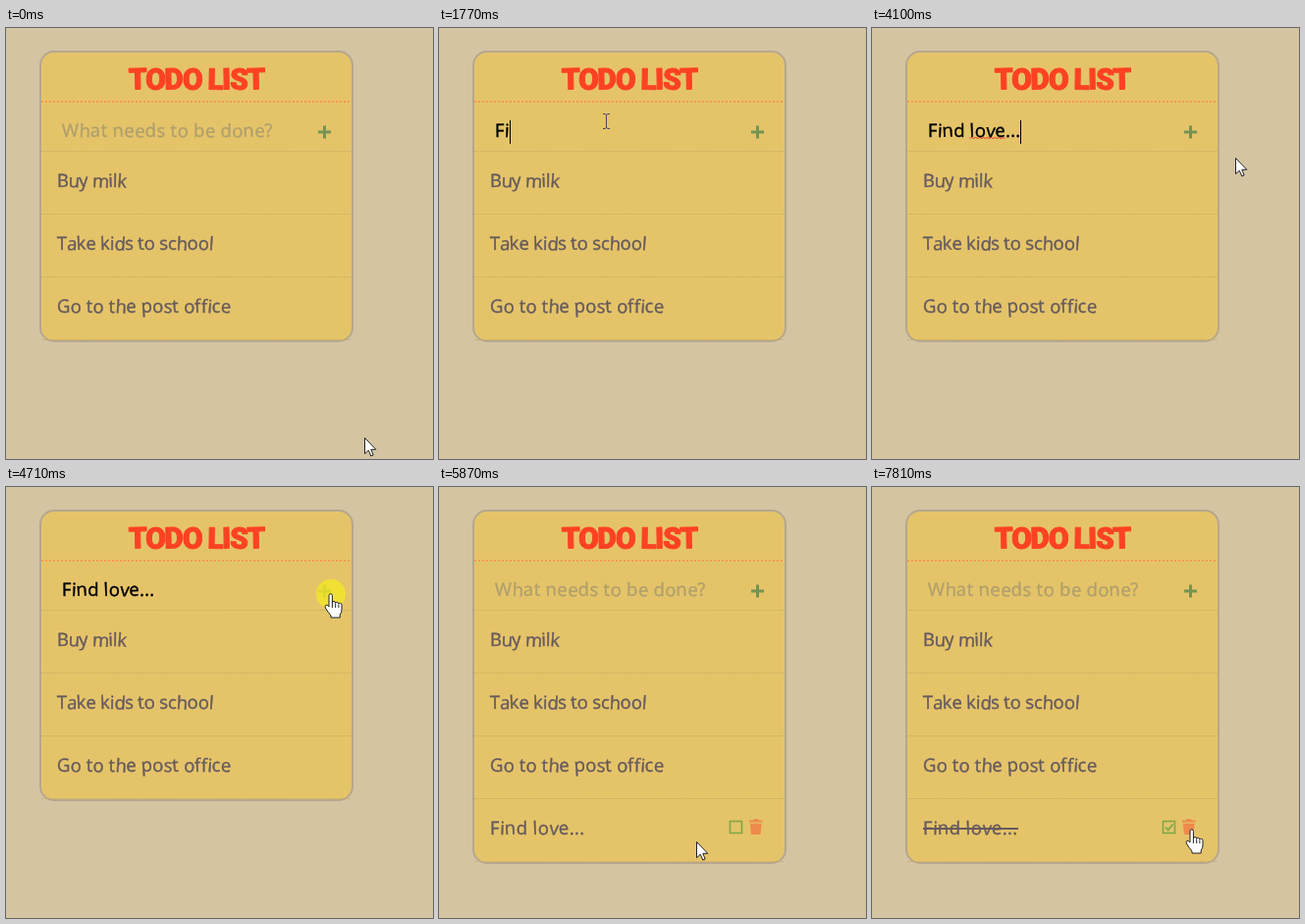
An HTML page for the animation above (8000 ms loop, 435 by 439 pixels).

```html
<!DOCTYPE html>
<html lang="en">
<head>
<meta charset="utf-8">
<title>Todo list</title>
<style>
  html, body { margin: 0; width: 100%; height: 100%; overflow: hidden; background: #d4c4a2; }
  svg { display: block; }
  text { font: 18.5px "Open Sans", sans-serif; font-kerning: none; font-variant-ligatures: none; white-space: pre; stroke-width: .4; }
  .title { font: 900 30px Roboto, sans-serif; letter-spacing: -1.3px; fill: #fd4223; stroke: #fd4223; stroke-width: 1; stroke-linejoin: round; }
  .item { fill: #675b5d; stroke: #675b5d; }
  .hint { fill: #b1a06c; stroke: #b1a06c; }
  .typed { fill: #000; stroke: #000; letter-spacing: .2px; }
  .rule { stroke: #c4a95f; stroke-dasharray: 1 1; }
</style>
</head>
<body>
<svg id="stage" width="435" height="439" viewBox="0 0 435 439">
  <rect id="card" x="35" y="24" width="318" height="295" rx="14" fill="#e5c469" stroke="#b6a78e" stroke-width="2"/>
  <text class="title" x="194" y="62.5" text-anchor="middle" rotate="-1 1 -1 1 0 1 -1 1 -1">TODO LIST</text>
  <path d="M36 75H352" stroke="#f39a50" stroke-width="2" stroke-dasharray="2 2"/>
  <path class="rule" d="M36 125.5H352"/>
  <path d="M324.5 99.5V112.5M318 106H331" stroke="#769350" stroke-width="3"/>
  <g id="rows"></g>
  <text id="hint" class="hint" x="57" y="111" letter-spacing=".3">What needs to be done?</text>
  <text id="typed" class="typed" x="57" y="111"></text>
  <path id="squiggle" fill="none" stroke="#e8301c"/>
  <path id="caret" stroke="#000"/>
  <g id="icons">
    <rect x="296.5" y="24" width="12" height="12" fill="none" stroke="#7fa746" stroke-width="1.6"/>
    <path id="tick" d="M299 30L301.7 32.8L306.5 27" fill="none" stroke="#7fa746" stroke-width="1.8"/>
    <path d="M316 23H320L321 21.5H324.5L325.5 23H329.5V25H316ZM317 26.2H328.5L327.8 36Q327.7 37.5 326.2 37.5H319.3Q317.8 37.5 317.7 36Z" fill="#ee8a4b"/>
  </g>
  <circle id="click" r="15" fill="#f3e628" opacity=".82"/>
  <g id="pointer" stroke-linejoin="round">
    <path id="arrow" d="M.5 .5V16.7L4.3 13.2L6.8 19L9.2 18L6.8 12.3H11.8Z" fill="#fff" stroke="#222"/>
    <path id="beam" d="M-3 -7.5H-1L.5 -6.5L2 -7.5H4M.5 -6.5V6.5M-3 7.5H-1L.5 6.5L2 7.5H4" fill="none" stroke="#484a5c"/>
    <path id="hand" d="M-2 13V1.5a1.7 1.7 0 0 1 3.4 0V9q0-1.5 1.6-1.5t1.7 1.8q.3-1 1.6-1t1.6 1.8q.4-.8 1.5-.8q1.6 0 1.6 2V16q0 3-1.8 5V24H0V22Q-3 18.500-5.600 14q-1-2.200 .6-2.800q1.200-.3 3 1.800ZM1.400 9V14M4.700 9.500V14M7.900 10.500V14" fill="#fff" stroke="#222"/>
  </g>
</svg>
<script>
const LOOP = 8000, ROW_TOP = 125, ROW_H = 64;
const ADDED = 4790, FOCUS = 530, BLUR = 4640, CHECKED = 6567, BLINK = 540;
const ENTRY = "Find love...";
const KEYS = [1300, 1770, 2000, 2077, 2153, 2230, 2400, 2550, 2780, 3790, 3867, 3943];

// text, letter spacing
const ITEMS = [["Buy milk", -.45], ["Take kids to school", -.23], ["Go to the post office", .08], [ENTRY, .37]];

// start, end, step count, waypoints
const MOVES = [
  [0, 0, 1, [[365, 417]]],
  [70, 380, 5, [[345, 385], [290, 295], [225, 215], [186, 158], [170, 95]]],
  [3790, 4560, 11, [[170, 95], [200, 91], [370, 132], [387, 126], [352, 112], [331, 109]]],
  [5020, 5790, 11, [[330, 122], [326, 184], [306, 260], [222, 318], [197, 350], [243, 357]]],
  [5870, 6260, 6, [[262, 361], [286, 364], [298, 358], [302, 351]]],
  [6640, 7260, 9, [[298, 369], [270, 405], [266, 408], [294, 388], [310, 360]]],
  [7410, 7640, 4, [[316, 357], [321, 354], [325, 352], [326, 350.5]]],
  [7810, 7810, 1, [[326, 349]]]
];

// start, end, x, y
const CLICKS = [[530, 690, 165, 94.5], [4640, 4790, 331, 109], [6490, 6640, 302, 350]];

const $ = id => document.getElementById(id);
const show = (id, on) => $(id).setAttribute("visibility", on ? "visible" : "hidden");
const attr = (el, map) => { for (const k in map) el.setAttribute(k, map[k]); return el; };
const make = (tag, map, parent) =>
  parent.appendChild(attr(document.createElementNS("http://www.w3.org/2000/svg", tag), map));

// small fixed tilt per letter for an uneven hand
const tilt = text => [...text].map((c, i) => ((i * 37 + 4) % 11 - 5) * .8).join(" ");

const rows = ITEMS.map(([text, spacing], i) => {
  const g = make("g", { transform: `translate(0 ${ROW_TOP + i * ROW_H})` }, $("rows"));
  make("text", { class: "item", x: 52, y: 37, "letter-spacing": spacing, rotate: tilt(text) }, g).textContent = text;
  make("path", { class: "rule", d: `M36 ${ROW_H + .5}H352` }, g);
  return g;
});
const strike = make("path", { d: "M52 31H149", stroke: "#675b5d", "stroke-width": 2 }, rows[3]);
attr($("hint"), { rotate: tilt($("hint").textContent) });
attr($("typed"), { rotate: tilt(ENTRY) });

let wave = "M99.5 113";
for (let i = 0; i < 9; i++) wave += "l2 -2l2 2";
attr($("squiggle"), { d: wave });

function spline(pts, u) {
  const last = pts.length - 1;
  const i = Math.min(Math.floor(u), Math.max(last - 1, 0)), f = u - i;
  const at = j => pts[Math.max(0, Math.min(last, j))];
  const [a, b, c, d] = [at(i - 1), at(i), at(i + 1), at(i + 2)];
  return [0, 1].map(k => b[k] + .5 * f * (c[k] - a[k] +
    f * (2 * a[k] - 5 * b[k] + 4 * c[k] - d[k] + f * (3 * (b[k] - c[k]) + d[k] - a[k]))));
}

function pointerAt(t) {
  const [from, to, steps, pts] = MOVES.filter(m => t >= m[0]).pop();
  if (steps === 1) return pts[0];
  const n = steps - 1;
  const k = Math.min(n, Math.floor((t - from) / (to - from) * n + .1));
  return spline(pts, k / n * (pts.length - 1));
}

function pointerShape(x, y, row) {
  if (x < 36 || x > 352) return "arrow";
  if (y > 76 && y < ROW_TOP) return x < 312 ? "beam" : x < 341 ? "hand" : "arrow";
  const dy = y - ROW_TOP - row * ROW_H;
  return row >= 0 && x > 294 && x < 331 && dy > 20 && dy < 38 ? "hand" : "arrow";
}

function draw(t) {
  const count = t >= ADDED ? 4 : 3;
  attr($("card"), { height: 103 + count * ROW_H });
  attr(rows[3], { visibility: count === 4 ? "visible" : "hidden" });
  attr(strike, { visibility: t >= CHECKED ? "visible" : "hidden" });

  const typed = t < ADDED ? KEYS.filter(k => t >= k).length : 0;
  $("typed").textContent = ENTRY.slice(0, typed);
  show("hint", !typed);
  const focused = t >= FOCUS && t < BLUR;
  show("squiggle", focused && typed > 9);
  const since = t - (typed ? KEYS[typed - 1] : FOCUS);
  show("caret", focused && t >= 610 && since % (2 * BLINK) < BLINK);
  const end = 57 + (typed ? Math.round($("typed").getComputedTextLength()) : 0);
  attr($("caret"), { d: `M${end + .5} 94V118` });

  const [x, y] = pointerAt(t).map(Math.round);
  const over = Math.floor((y - ROW_TOP) / ROW_H);
  const row = x > 35 && x < 353 && over >= 0 && over < count ? over : -1;
  show("icons", row >= 0);
  attr($("icons"), { transform: `translate(0 ${ROW_TOP + Math.max(row, 0) * ROW_H - .5})` });
  show("tick", row === 3 && t >= CHECKED);

  const click = CLICKS.find(c => t >= c[0] && t < c[1]);
  show("click", click);
  if (click) attr($("click"), { cx: click[2], cy: click[3] });

  const shape = pointerShape(x, y, row);
  for (const id of ["arrow", "beam", "hand"]) show(id, id === shape);
  attr($("pointer"), { transform: `translate(${x} ${y})` });
}

const start = performance.now();
function tick(now) {
  draw(Math.max(0, now - start) % LOOP);
  requestAnimationFrame(tick);
}
draw(0);
requestAnimationFrame(tick);
</script>
</body>
</html>
```
